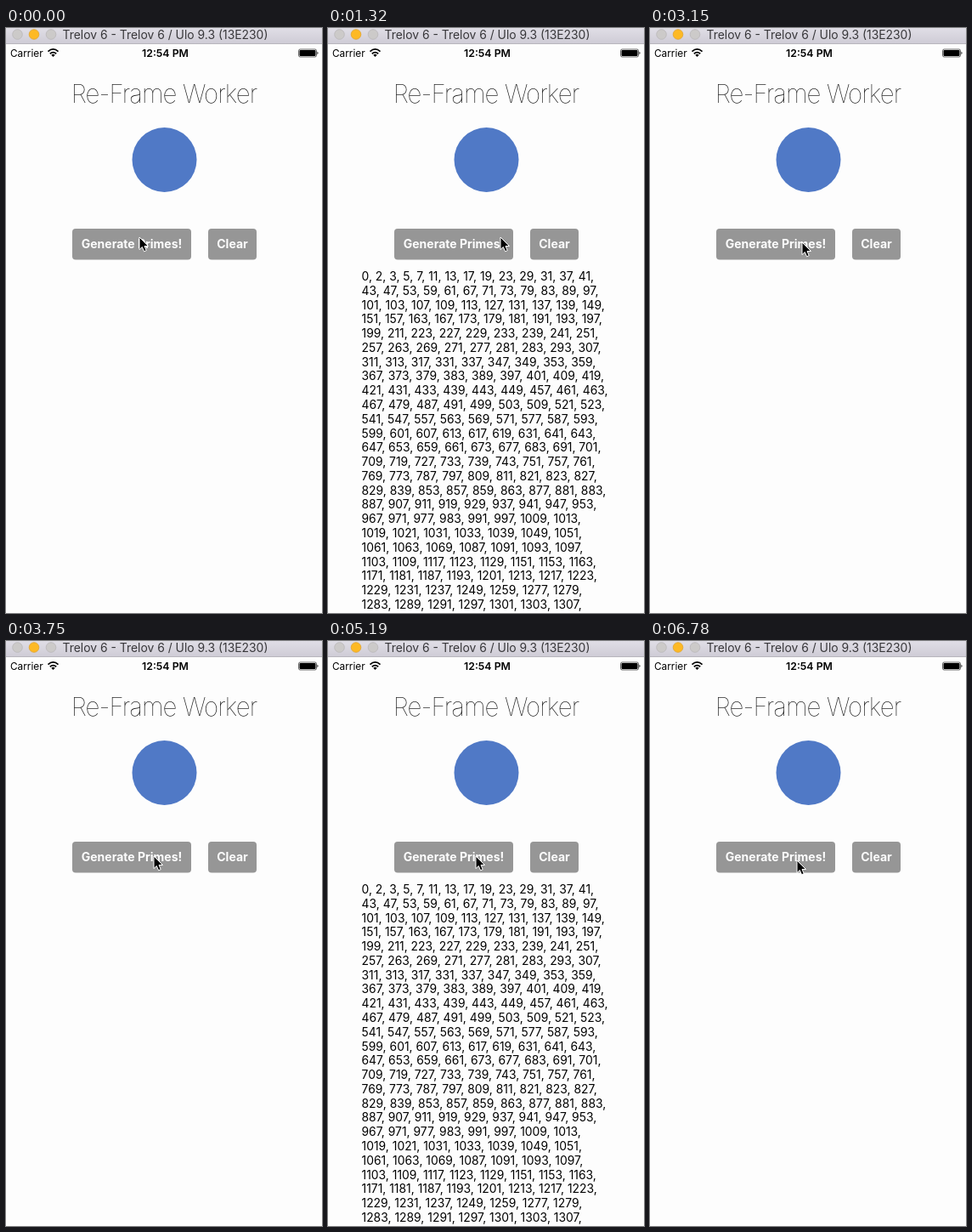
Animation of 372 by 688 pixels, one loop 6.81 s. Source, as an HTML page:

```html
<!DOCTYPE html>
<html lang="en">
<head>
<meta charset="utf-8">
<title>Re-Frame Worker</title>
<style>
  html, body { margin: 0; width: 100%; height: 100%; overflow: hidden; background: #fdfdfd; }
  svg { display: block; width: 372px; height: 688px; }
  text { font-family: Inter, Roboto, "Open Sans", sans-serif; }
  .mid { text-anchor: middle; }
  .button rect { fill: #969696; }
  .button text { fill: #fdfdfd; font-size: 14px; font-weight: 700; }
  .button.pressed rect { fill: #000; }
  .button.pressed text { fill: #9c9c9c; }
  #primes { font-size: 13.9px; }
</style>
</head>
<body>
<svg viewBox="0 0 372 688">
  <defs>
    <linearGradient id="chrome" x2="0" y2="1">
      <stop offset="0" stop-color="#e0dee6"/>
      <stop offset="1" stop-color="#cecbd5"/>
    </linearGradient>
  </defs>
  <rect width="372" height="688" fill="#fdfdfd"/>

  <!-- window bar -->
  <rect width="372" height="19" fill="url(#chrome)"/>
  <rect y="18" width="372" height="1" fill="#b8b6bd"/>
  <g fill="#cccac9" stroke="#b9b7b8" stroke-width=".8">
    <circle cx="13.5" cy="7.5" r="5.8"/>
    <circle cx="33" cy="7.5" r="5.8" fill="#fdb924" stroke="#e0a32c"/>
    <circle cx="53" cy="7.5" r="5.8"/>
  </g>
  <text class="mid" x="187.5" y="13" font-size="13.9" fill="#38373a">Trelov 6 - Trelov 6 / Ulo 9.3 (13E230)</text>

  <!-- status bar -->
  <text x="5" y="33.5" font-size="11.8">Carrier</text>
  <g fill="none" stroke="#000" stroke-width="1.8">
    <path d="M49.5 27.6Q55.5 22.2 61.5 27.6"/>
    <path d="M51.8 30.2Q55.5 27 59.2 30.2"/>
  </g>
  <path d="M53.3 31.7Q55.5 30 57.7 31.7L55.5 34Z"/>
  <text class="mid" x="187.5" y="33.5" font-size="12.3" font-weight="600">12:54 PM</text>
  <rect x="344.5" y="25" width="21" height="9" rx="1.8" fill="none" stroke="#000" stroke-width=".6"/>
  <rect x="345.5" y="26" width="19" height="7" rx="1"/>
  <path d="M366.5 27.8Q368.5 29.5 366.5 31.2Z"/>

  <text class="mid" x="186" y="88" font-size="29.5" font-weight="100" letter-spacing="-.9" fill="#111">Re-Frame Worker</text>
  <circle cx="186.5" cy="155" r="38" fill="#5079c6"/>

  <g class="button" id="generate">
    <rect x="78" y="236" width="140" height="36.5" rx="4"/>
    <text class="mid" x="148" y="259">Generate Primes!</text>
  </g>
  <g class="button" id="clear">
    <rect x="238" y="236" width="57" height="36.5" rx="4"/>
    <text class="mid" x="266.5" y="259">Clear</text>
  </g>
  <g id="primes"></g>
  <path id="cursor" d="M0 0V14.6L3.3 11.5L5.6 16.8L8.2 15.6L6 10.5H10.5Z" stroke="#fff" stroke-width="1"/>
</svg>
<script>
  const LOOP = 6810, STEP = 30;
  const byId = id => document.getElementById(id);
  const generate = byId('generate'), clear = byId('clear');
  const primes = byId('primes'), cursor = byId('cursor');

  // Time spans in ms for each state
  const generatePresses = [[780, 930], [3780, 3930]];
  const clearPresses = [[2010, 2400], [5490, 5820]];
  const resultsShown = [[1170, 2130], [4650, 5610]];

  // Pointer stops: time, x, y
  const stops = [
    [0, 157, 246], [1110, 157, 246], [1320, 203, 246], [1620, 284, 256],
    [2490, 284, 256], [2760, 264, 262], [3120, 179, 252], [3480, 179, 252],
    [3690, 174, 253], [5220, 174, 253], [5460, 274, 257], [6000, 278, 261],
    [6210, 278, 261], [6600, 173, 258], [LOOP, 173, 258]
  ];

  function isPrime(n) {
    for (let d = 2; d * d <= n; d++) if (n % d === 0) return false;
    return n > 1;
  }

  function buildPrimes() {
    const perLine = [14, 12, 10, 10, ...Array(13).fill(9), 8, 7, 7, 8, 8, 7, 7];
    let n = 0;
    perLine.forEach((count, row) => {
      const line = [];
      for (; line.length < count; n++) if (n === 0 || isPrime(n)) line.push(n);
      const text = document.createElementNS('http://www.w3.org/2000/svg', 'text');
      text.setAttribute('x', 39.5);
      text.setAttribute('y', 297 + row * 16.78);
      text.textContent = line.join(', ') + ',';
      primes.append(text);
    });
  }

  const within = (spans, t) => spans.some(([from, to]) => t >= from && t < to);
  const ease = p => p * p * (3 - 2 * p);

  function pointerAt(t) {
    const i = stops.findIndex(stop => stop[0] > t);
    const [t0, x0, y0] = stops[i - 1], [t1, x1, y1] = stops[i];
    const p = ease((t - t0) / (t1 - t0));
    return [x0 + (x1 - x0) * p, y0 + (y1 - y0) * p];
  }

  function render(t) {
    generate.classList.toggle('pressed', within(generatePresses, t));
    clear.classList.toggle('pressed', within(clearPresses, t));
    primes.setAttribute('visibility', within(resultsShown, t) ? 'visible' : 'hidden');
    cursor.setAttribute('transform', `translate(${pointerAt(t)})`);
  }

  buildPrimes();
  const start = performance.now();
  function tick() {
    const elapsed = (performance.now() - start) % LOOP;
    render(Math.floor(elapsed / STEP) * STEP);
    requestAnimationFrame(tick);
  }
  tick();
</script>
</body>
</html>
```
